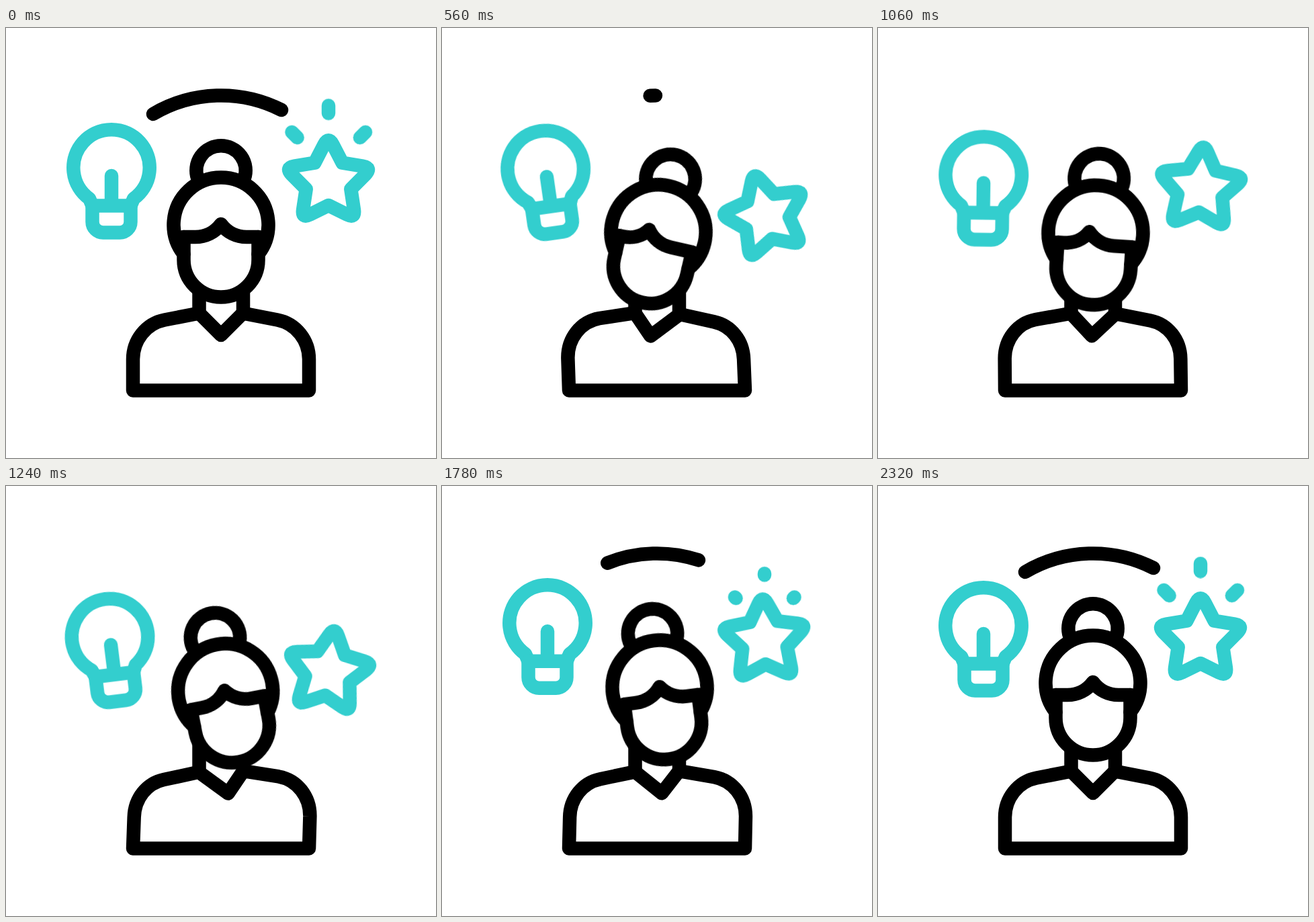
An HTML page without scripts that plays this animation: 640 px wide and 640 px high, repeating every 2.4 s.

```html
<!DOCTYPE html>
<html lang="en">
<head>
<meta charset="utf-8">
<title>Creative talent</title>
<style>
html, body { margin: 0; width: 100%; height: 100%; overflow: hidden; background: #fff; }
svg { display: block; width: 100%; height: 100%; }
.ink, .teal {
  fill: none; stroke: #000; stroke-width: 20.5;
  stroke-linecap: round; stroke-linejoin: round;
}
.teal { stroke: #33cece; }
.face { fill: #fff; }

.body, .head, .fringe, .arc, .bulb, .star, .ray {
  animation: 2.4s cubic-bezier(.333, 0, .667, 1) infinite;
}
.body { animation-name: lean; }
.head { animation-name: tilt; transform-origin: 320px 293px; }
.fringe { animation-name: sweep; }
.arc { animation-name: trim; }
.bulb { animation-name: bulb-swing, bulb-bob; transform-origin: 157px 228px; }
.star { animation-name: star-swing, star-bob; transform-origin: 0 0; }
.ray { animation-name: burst; }

@keyframes lean {
  0%, 83.33%, 100% { d: path("M287.5 424.5L236 434.5C208 440 189 465 189 493L189 539.5L451 539.5L451 493C451 465 432 440 404 434.5L352.5 424.5L320 457Z"); }
  26.67%, 36.67% { d: path("M287 424L234 432C206 437 187 462 187.3 491L189 539.5L451 539.5L449 493C448 465 430 443 405 437.5L354 426L310 458.5Z"); }
  55%, 66.67% { d: path("M287 426L235 437.5C210 443 192 465 191 493L189 539.5L451 539.5L452.7 491C453 462 434 437 406 432L353 424L332.5 457.5Z"); }
}
@keyframes tilt {
  0%, 83.33%, 100% { transform: translate(0, 0) rotate(0deg); }
  26.67%, 36.67% { transform: translate(2.2px, 11.3px) rotate(13.4deg); }
  55%, 66.67% { transform: translate(7px, 12.2px) rotate(-13deg); }
}
@keyframes sweep {
  0%, 55%, 100% { d: path("M264.5 311L282 311C297 311 311 304 320 292C329 304 343 311 358 311L375.5 311"); }
  26.67%, 36.67% { d: path("M264.5 311L268 311C283 311 297 305 305 292.5C314 304 328 311 343 311L375.5 311"); }
}
@keyframes trim {
  0%, 84%, 100% { stroke-dasharray: 200 400; stroke-dashoffset: 0; opacity: 1; }
  26.66%, 57.34% { stroke-dasharray: 0 400; stroke-dashoffset: -100; opacity: 1; }
  26.67%, 57.33% { stroke-dasharray: 0 400; stroke-dashoffset: -100; opacity: 0; }
}
@keyframes bulb-swing {
  0%, 65%, 100% { rotate: 0deg; }
  16.67% { rotate: -19deg; }
  35% { rotate: 17deg; }
  50% { rotate: -7.3deg; }
}
@keyframes bulb-bob {
  0%, 90%, 100% { translate: 0 0; }
  23.33% { translate: 0 1.3px; }
  36.67% { translate: 0 4.7px; }
  51.67% { translate: 0 16.4px; }
  65% { translate: 0 -9.5px; }
  84.17% { translate: 0 2.5px; }
}
@keyframes star-swing {
  0%, 96.67%, 100% { rotate: 0deg; }
  23.33% { rotate: -15.5deg; }
  36.67% { rotate: 0deg; }
  51.67% { rotate: 8deg; }
  65% { rotate: -7.3deg; }
  84.17% { rotate: 2.9deg; }
}
@keyframes star-bob {
  0%, 96.67%, 100% { translate: 0 0; }
  10% { translate: 0 -30px; }
  23.33% { translate: 2px 51px; }
  36.67% { translate: 0 -28px; }
  51.67% { translate: 0 48px; }
  65% { translate: 0 -11px; }
  84.17% { translate: 0 15px; }
  90% { translate: 0 9px; }
  93.33% { translate: 0 -42px; }
}
@keyframes burst {
  0%, 83.33%, 100% { translate: 0 0; stroke-dasharray: 12 40; opacity: 1; }
  16.66% { translate: 0 -30px; stroke-dasharray: 0 40; opacity: 1; }
  16.67% { translate: 0 -30px; stroke-dasharray: 0 40; opacity: 0; }
  70.83% { translate: 0 18px; stroke-dasharray: 0 40; opacity: 0; }
  70.84% { translate: 0 18px; stroke-dasharray: 0 40; opacity: 1; }
}
</style>
</head>
<body>
<svg viewBox="0 0 640 640">
  <g class="ink">
    <path class="arc" pathLength="200" d="M219 128A199 199 0 0 1 410 122"/>
    <path d="M287.5 425V366M353 425V366"/>
    <path class="body" d="M287.5 424.5L236 434.5C208 440 189 465 189 493L189 539.5L451 539.5L451 493C451 465 432 440 404 434.5L352.5 424.5L320 457Z"/>
    <g class="head">
      <path class="face" d="M264.5 311V345a55.5 55.5 0 0 0 111 0V311" />
      <path d="M264.5 336.5A70.5 70.5 0 1 1 375.5 336.5"/>
      <path d="M285.3 224A36.7 36.7 0 1 1 354.7 224"/>
      <path class="fringe" d="M264.5 311L282 311C297 311 311 304 320 292C329 304 343 311 358 311L375.5 311"/>
    </g>
  </g>

  <g class="teal">
    <g class="bulb">
      <path d="M128.5 264.5L124 254A56.7 56.7 0 1 1 190 254L185.5 264.5"/>
      <path d="M128.5 264.5H185.5V288.5a16 16 0 0 1-16 16H144.5a16 16 0 0 1-16-16ZM157 220V264"/>
    </g>
    <g transform="translate(480 115.5)"><path class="ray" d="M0 0V11.5"/></g>
    <g transform="translate(425.5 155) rotate(-45)"><path class="ray" d="M0 0V11.5"/></g>
    <g transform="translate(535 155) rotate(45)"><path class="ray" d="M0 0V11.5"/></g>
    <g transform="translate(480 229)">
      <path class="star" d="M-6.5-55.6Q0-68 6.5-55.6L20.6-28.3 50.9-23.3Q64.7-21 54.9-11L33.3 10.8 37.9 41.2Q40 55 27.5 48.7L0 35-27.5 48.7Q-40 55-37.9 41.2L-33.3 10.8-54.9-11Q-64.7-21-50.9-23.3L-20.6-28.3Z"/>
    </g>
  </g>
</svg>
</body>
</html>
```
